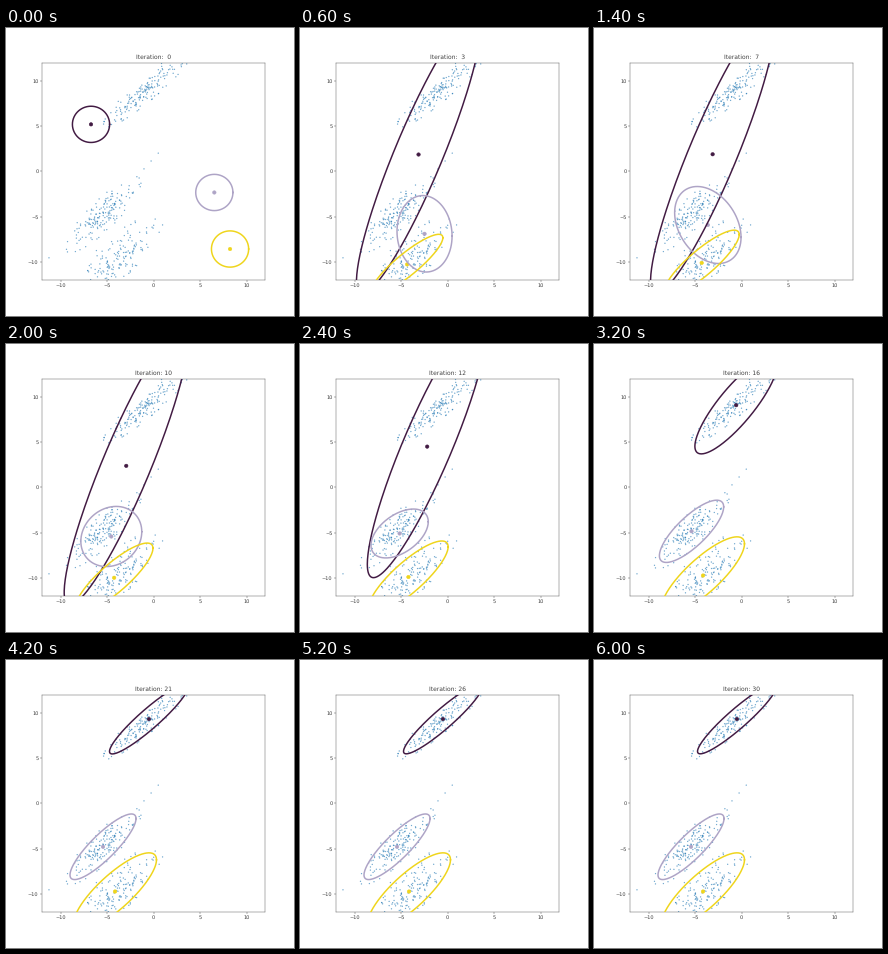
These frames come from a looping animation (288 px wide and 288 px high, 6.2 s). A matplotlib script:

```python
import numpy as np
import matplotlib.pyplot as plt
from matplotlib.animation import FuncAnimation

N_ITER = 31
INTERVAL = 200
INK = "0.25"
COLORS = ["#421b43", "#aea4c6", "#efd51c"]

# Gaussians as centre x, centre y, 2-sigma half extents, correlation.
TOP = (-0.50, 9.30, 4.24, 3.84, 0.93)
MIDDLE = (-5.44, -4.80, 3.55, 3.62, 0.86)
BOTTOM = (-4.15, -9.74, 4.46, 4.27, 0.82)

# Seeds of the fit, and what each component grabs before it settles.
SEEDS = [(-6.73, 5.18), (6.53, -2.34), (8.22, -8.58)]
GRABBED = (-5.75, -5.60, 4.00, 4.00, 0.95)
TIGHT = (-4.40, -10.40, 3.70, 3.10, 0.90)
WANDER = [(-2.48, -6.90, 2.96, 4.22, -0.06),
          (-3.63, -5.93, 3.57, 4.25, -0.32),
          (-5.16, -5.10, 3.08, 2.70, 0.48),
          MIDDLE]


def place(state, u, v):
    """Map unit coordinates into the frame of one Gaussian."""
    cx, cy, hx, hy, rho = state
    return cx + hx * u, cy + hy * (rho * u + np.sqrt(1 - rho**2) * v)


def mix(a, b, w):
    """Moments of two Gaussians pooled with weight w on the second."""
    a, b = np.array(a), np.array(b)
    gap = b[:2] - a[:2]
    spread = 4 * w * (1 - w)
    var = (1 - w) * a[2:4]**2 + w * b[2:4]**2 + spread * gap**2
    cov = ((1 - w) * a[2:].prod() + w * b[2:].prod() + spread * gap.prod())
    return [*(a[:2] + w * gap), *np.sqrt(var), cov / np.sqrt(var.prod())]


def along(keys, poses, i):
    return [np.interp(i, keys, col) for col in zip(*poses)]


def states(i):
    if i == 0:
        return [(x, y, 2, 2, 0) for x, y in SEEDS]
    share = 0.5 / (1 + np.exp(i - 12.6))
    return [mix(TOP, GRABBED, share),
            along([3, 7, 12, 17], WANDER, i),
            along([0, 16], [TIGHT, BOTTOM], i)]


def sample(rng, state, n=170):
    z = rng.standard_normal((n, 2))
    r = np.hypot(*z.T)
    z *= (np.minimum(r, 2.3) / r)[:, None]
    return np.column_stack(place(state, *(z.T / 2)))


rng = np.random.default_rng(20)
strays = np.linspace((-1.8, -0.6), (0.5, 2), 4)
points = np.vstack([sample(rng, s) for s in (TOP, MIDDLE, BOTTOM)]
                   + [strays, [(-11.25, -9.55)]])

plt.rcParams.update({
    "text.hinting": "none", "text.color": INK, "axes.edgecolor": INK,
    "xtick.color": INK, "ytick.color": INK,
    "axes.titlepad": 8, "xtick.major.pad": 2,
})
fig = plt.figure(figsize=(8, 8), dpi=36, facecolor="white")
ax = fig.add_axes([0.125, 0.125, 0.775, 0.755])
ax.set(xlim=(-12, 12), ylim=(-12, 12),
       xticks=range(-10, 11, 5), yticks=range(-10, 11, 5))
title = ax.set_title("")

# One size per point keeps the markers off the pixel grid.
ax.scatter(*points.T, s=np.full(len(points), 3.0), alpha=0.5, color="#1f77b4")
rings = [ax.plot([], [], color=c, lw=3, zorder=3)[0] for c in COLORS]
dots = [ax.add_patch(plt.Circle((0, 0), 0.19, color=c, zorder=2)) for c in COLORS]

theta = np.linspace(0, 2 * np.pi, 241)


def update(i):
    title.set_text(f"Iteration: {i:2d}")
    for state, ring, dot in zip(states(i), rings, dots):
        ring.set_data(*place(state, np.cos(theta), np.sin(theta)))
        dot.set_center(state[:2])
    return [title, *rings, *dots]


anim = FuncAnimation(fig, update, frames=N_ITER, interval=INTERVAL,
                     repeat=True, repeat_delay=0, blit=False)
plt.show()
```
